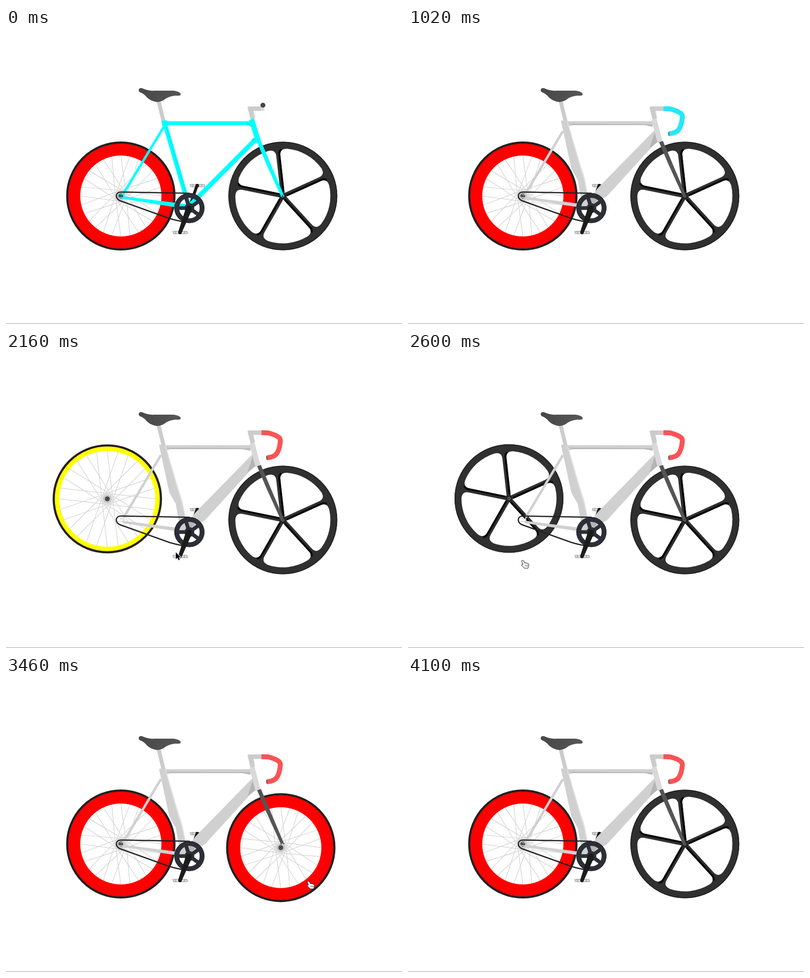
Recreate the animation shown at these times as an HTML page with a canvas. Size 800 by 600 pixels, loop 4120 ms.

```html
<!DOCTYPE html>
<html lang="en">
<head>
<meta charset="utf-8">
<title>Bike builder</title>
<style>
html, body { margin: 0; width: 100%; height: 100%; overflow: hidden; background: #fff }
canvas { display: block }
</style>
</head>
<body>
<canvas id="stage" width="800" height="600"></canvas>
<script>
const LOOP = 4120, TICK = 20, TAU = Math.PI * 2, STEP = TAU / 5;
const ctx = document.getElementById('stage').getContext('2d');

// Eased value at time t through [time, value] keys
function track(t, keys) {
  let [t0, v0] = keys[0];
  for (const [t1, v1] of keys) {
    if (t < t1) {
      const k = Math.max(0, (t - t0) / (t1 - t0));
      return v0 + (v1 - v0) * k * k * (3 - 2 * k);
    }
    t0 = t1;
    v0 = v1;
  }
  return v0;
}

function at(x, y, draw) {
  ctx.save();
  ctx.translate(x, y);
  draw();
  ctx.restore();
}

function fill(d, color) {
  ctx.fillStyle = color;
  ctx.fill(new Path2D(d), 'evenodd');
}

function line(d, width, color, cap = 'butt') {
  ctx.lineWidth = width;
  ctx.strokeStyle = color;
  ctx.lineCap = cap;
  ctx.lineJoin = 'round';
  ctx.stroke(new Path2D(d));
}

function disc(x, y, r, color) {
  ctx.fillStyle = color;
  ctx.beginPath();
  ctx.arc(x, y, r, 0, TAU);
  ctx.fill();
}

function ring(r, width, color) {
  ctx.lineWidth = width;
  ctx.strokeStyle = color;
  ctx.beginPath();
  ctx.arc(0, 0, r, 0, TAU);
  ctx.stroke();
}

// Draws the neighbours of position p in a strip of parts
function strip(parts, p, dx, dy, draw) {
  parts.forEach((part, i) => {
    const d = i - p;
    if (Math.abs(d) < 1) at(d * dx, d * dy, () => draw(part));
  });
}

function spokedWheel(color, inner) {
  ctx.lineWidth = 1.2;
  ctx.strokeStyle = '#d2d2d2';
  ctx.lineCap = 'butt';
  ctx.beginPath();
  for (let i = 0; i < 28; i++) {
    const a = i * TAU / 28, h = a + (i % 2 ? 1.4 : -1.4);
    ctx.moveTo(11 * Math.cos(h), 11 * Math.sin(h));
    ctx.lineTo(inner * Math.cos(a), inner * Math.sin(a));
  }
  ctx.stroke();
  ring((106.5 + inner) / 2, 106.5 - inner, color);
  ring(108.3, 4.4, '#231f20');
  disc(0, 0, 10, '#d2d2d2');
  disc(0, 0, 7, '#b8b8b8');
  disc(0, 0, 4.4, '#151515');
  ring(2.3, .8, '#ddd');
}

function magWheel() {
  const first = -96.4 * Math.PI / 180, half = 4.2;
  ctx.beginPath();
  ctx.arc(0, 0, 110, 0, TAU);
  for (let i = 0; i < 5; i++) {
    const a = first + i * STEP;
    const from = (x, y, r = a) =>
      [x * Math.cos(r) - y * Math.sin(r), x * Math.sin(r) + y * Math.cos(r)];
    const far = (x, y) => from(x, y, a + STEP);
    ctx.moveTo(...from(6, half));
    ctx.lineTo(...from(82, half));
    ctx.quadraticCurveTo(...from(96, half), ...from(96 * Math.cos(.2), 96 * Math.sin(.2)));
    ctx.arc(0, 0, 96, a + .2, a + STEP - .2);
    ctx.quadraticCurveTo(...far(96, -half), ...far(82, -half));
    ctx.lineTo(...far(6, -half));
    ctx.closePath();
  }
  ctx.fillStyle = '#303030';
  ctx.fill('evenodd');
  ring(109, 2, '#242424');
  for (let i = 0; i < 5; i++) {
    ctx.save();
    ctx.rotate(first + i * STEP);
    line('M8 2.2H86Q91 3 94 7', 3.8, '#050505');
    ctx.restore();
  }
  disc(0, 0, 7, '#222');
  ring(2.4, 1, '#aaa');
}

const wheels = {
  red: () => spokedWheel('#f00', 82),
  yellow: () => spokedWheel('#ff0', 97),
  mag: magWheel
};
const drawWheel = name => wheels[name]();

function fork(color) {
  fill('M507 231L515 229L534 274L560.5 337L555.5 341L526 276Z', color);
  line('M557 336L555.5 342M558 337L562 341', 2, color);
}

function dropout(color) {
  line('M239 338H230M239 343.5H228M238 335V346', 1.7, color);
}

function thinFrame([main, shade]) {
  line('M319 200L237 336', 5, main);
  fill('M236 341L340 354L370 358V367L340 363L236 346Z', main);
  dropout(main);
  line('M320 193H496', 8, main);
  line('M319 188L369 360', 9, main);
  line('M504 226L369 362', 9.5, main);
  line('M324 202L367 348', 1.5, shade);
  line('M486 193L496 199', 3, shade);
  line('M497 227L504 224', 4, shade);
  fork(main);
  fill('M491 187L501 183L515 229L505 233Z', main);
  fill('M314 188L325 187L327 197L316 199Z', main);
  disc(369, 361.5, 7, main);
}

function aeroFrame() {
  const main = '#d0d0d0', shade = '#b5b5b5';
  line('M313 209L238 335', 5, main);
  fill('M236 342L345 356L370 358V367L236 347Z', main);
  dropout(main);
  fill('M318 189H494V200L478 197H334L322 200Z', main);
  fill('M322 194L334 197H478L494 200V195Z', '#bbb');
  fill('M309 188L322 187L346 270L357 305L367 358L352 358L343 308L330 285Z', main);
  line('M322 190L345 272L356 307L366 352', 1.5, '#e4e4e4');
  fill('M498 207L383 325L362 352L368 368L382 352L402 341L490 244L506 229Z', main);
  fill('M360 342L384 336L380 352L366 362Z', shade);
  fill('M499 210L488 243L506 230Z', shade);
  fork('#555');
  fill('M492 187L502 183L514 229L504 233Z', '#d9d9d9');
}

const frames = [['#0ff', '#0de4e8'], ['#5e5e5e', '#505050'], ['#e8e8e8', '#ddd'], null];
const drawFrame = colors => colors ? thinFrame(colors) : aeroFrame();

function drawBar(color) {
  if (!color) {
    fill('M515 158H522V168H515Z', '#ddd');
    disc(519, 156.5, 5, '#444');
    return;
  }
  line('M516 163.5L530 164Q545 168 551 173Q555 176 554 183Q552 200 546 207Q541 213 527 214.5',
    10, color);
  line('M526.5 211L527 218', 2, '#555');
}

function seat() {
  line('M308 147L318 188', 8, '#ccc');
  const g = ctx.createLinearGradient(268, 0, 353, 0);
  g.addColorStop(0, '#484848');
  g.addColorStop(1, '#565656');
  fill('M268 127Q268 121 275 122Q287 128 300 127L338 127Q353 129 353 135Q352 138 343 137' +
    'Q331 138 323 143Q315 150 305 150Q294 149 285 141Q279 133 270 130Z', g);
}

function stem() {
  fill('M488 161Q488 159 491 159H520V168H500L503 183L494 186Z', '#ccc');
}

function pedal(x, y) {
  line(`M${x - 14} ${y - 2}H${x + 14}L${x + 15} ${y + 2}H${x - 13}Z`, 2.5, '#bbb');
  line(`M${x - 9} ${y - 3}V${y + 3}M${x + 9} ${y - 3}V${y + 3}`, 2, '#aaa');
  disc(x, y, 3.5, '#151515');
}

function drivetrain() {
  line('M371 335L233 332.5C220 332 220 346 230 350L330 386Q350 392 368 394', 2.5, '#222');
  at(370.5, 365, () => {
    ring(25.5, 9.5, '#2e2e38');
    ring(30, 1, '#222');
    disc(0, 0, 10, '#2e2e38');
    for (let i = 0; i < 5; i++) {
      ctx.save();
      ctx.rotate(Math.PI + i * STEP);
      line('M4 0H24', 7.5, '#2e2e38');
      ctx.restore();
    }
  });
  pedal(351.5, 414.5);
  fill('M364 363Q369 357 375 363L374 372L355 415Q351 418 348 413Z', '#1c1c1c');
}

function pointer(t) {
  if (t < 1900 || t > 3900) return;
  const x = track(t, [[1900, 400], [2160, 343], [2300, 245], [2600, 230], [3020, 164],
    [3200, 145], [3390, 605], [3460, 609], [3900, 640]]);
  const y = track(t, [[1900, 330], [2160, 406], [2300, 420], [3020, 427], [3200, 430],
    [3390, 412], [3460, 416], [3900, 430]]);
  at(x, y, () => {
    if (t < 2240) {
      const arrow = 'M0 0V14L3.2 11L5.5 16L8 15L5.8 10H10Z';
      line(arrow, 2, '#fff');
      fill(arrow, '#000');
      return;
    }
    const hand = 'M0 1Q2-1 4 2L6 6Q8 4 9 6Q11 5 12 7Q14 7 13.5 10L12 15H5.5L0 9.5Q0 7 3 9Z';
    line(hand, 2, '#222');
    fill(hand, '#fff');
    line('M7 9V12M9.3 9V12M11.5 9V12', .8, '#222');
  });
}

function render(t) {
  ctx.fillStyle = '#fff';
  ctx.fillRect(0, 0, 800, 600);

  const lift = track(t, [[1660, 0], [1800, 1], [3040, 1], [3180, 0]]);
  const rear = track(t, [[1830, 0], [2168, 1], [2260, 1], [2600, 2], [2680, 2], [2990, 3]]);
  at(232 - 28 * lift, 340.5 - 43.5 * lift, () =>
    strip(['red', 'yellow', 'mag', 'red'], rear, 420, 420, drawWheel));

  const drop = track(t, [[3200, 0], [3260, 1], [3386, 1], [3486, 0],
    [3560, 0], [3640, 1], [3980, 1], [4080, 0]]);
  const front = track(t, [[3250, 0], [3386, 1], [3640, 1], [3800, 2], [3830, 2], [3980, 3]]);
  at(559.3 - 25 * drop, 340.5 + 44 * drop, () =>
    strip(['mag', 'red', 'yellow', 'mag'], front, -420, 420, drawWheel));

  pedal(386.5, 319.5);
  line('M386 319L371 362', 6, '#1c1c1c', 'round');
  seat();
  stem();
  const frame = track(t, [[20, 0], [220, 1], [270, 1], [470, 2], [500, 2], [700, 3]]);
  strip(frames, frame, 0, 430, drawFrame);
  const bar = track(t, [[720, 0], [1000, 1], [1100, 1], [1580, 2]]);
  strip([null, '#25e8f6', '#fb5355'], bar, 600, 0, drawBar);
  drivetrain();
  pointer(t);

  ctx.fillStyle = '#a0a0a0';
  ctx.fillRect(0, 599, 800, 1);
}

const start = performance.now();
function tick() {
  const t = (performance.now() - start) % LOOP;
  // The picture advances in even steps; the margin absorbs clock rounding
  render(Math.floor(t / TICK + .2) * TICK);
  requestAnimationFrame(tick);
}
tick();
</script>
</body>
</html>
```
